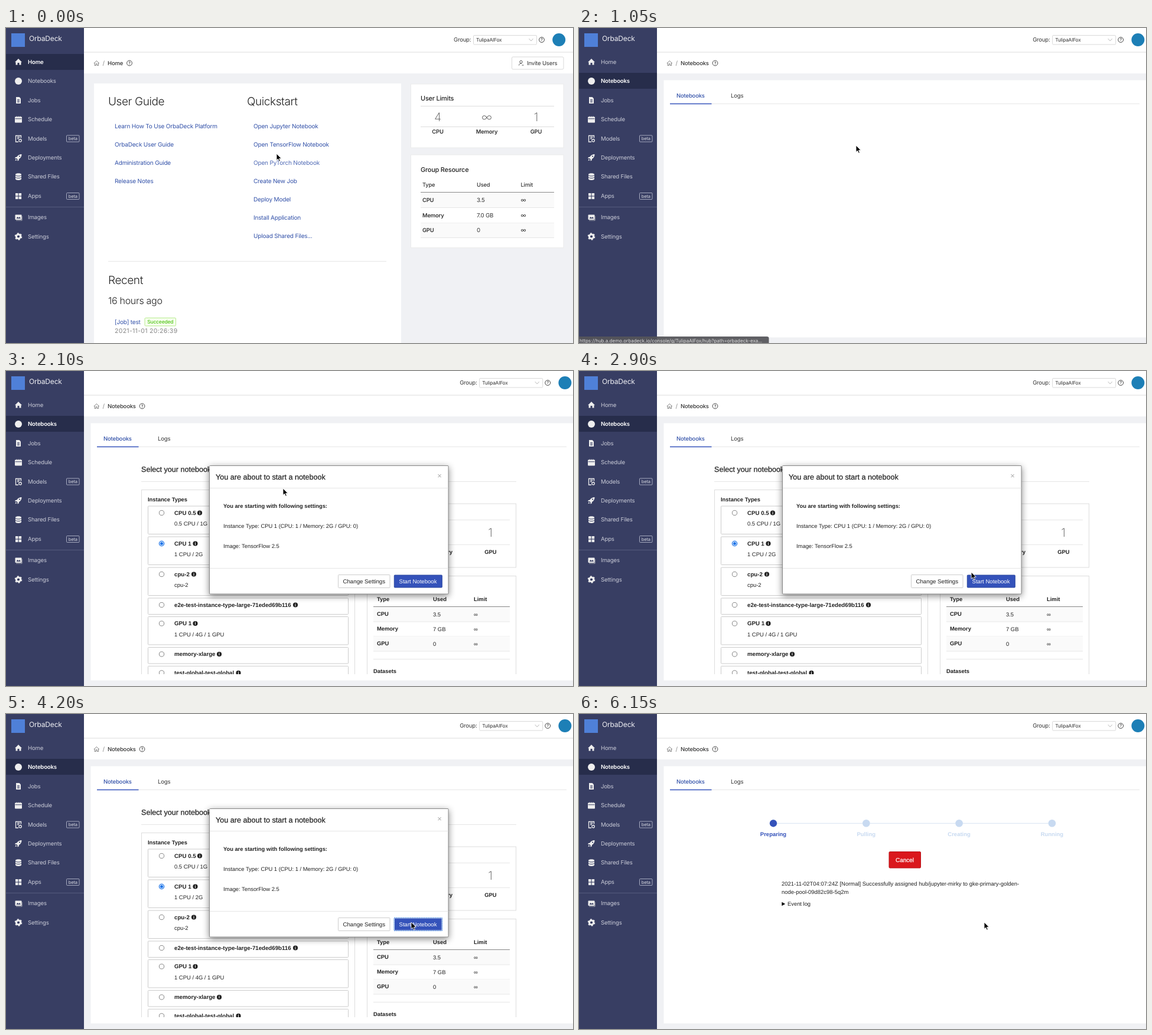
An HTML page for the animation above (6350 ms loop, 960 by 534 pixels).

```html
<!DOCTYPE html>
<html lang="en">
<head>
<meta charset="utf-8">
<title>Notebook launch</title>
<style>
html, body { margin: 0; width: 100%; height: 100%; overflow: hidden; background: #f0f1f4; }
svg { display: block; width: 960px; height: 534px; }
text { font-family: Inter, sans-serif; letter-spacing: -.18px; white-space: pre; text-rendering: geometricPrecision; }
.h { font-family: "Liberation Sans", Arial, sans-serif; letter-spacing: 0; }
</style>
</head>
<body>
<svg id="stage" viewBox="0 0 960 534"></svg>
<script>
const LOOP = 6350, INK = '#333', LINK = '#3150a8', BLUE = '#3452ba', PALE = '#c8daf1', NAVY = '#383e63', SIDE = 132;

// Drawing helpers; text is placed by the middle of its capitals.
const text = (x, y, s, size = 10, fill = INK, more = '') =>
  `<text x="${x}" y="${y + size * .36}" font-size="${size}" fill="${fill}" ${more}>${s}</text>`;
const helv = (x, y, s, size = 9.45, fill = '#222', more = '') => text(x, y - .4, s, size, fill, 'class="h" ' + more);
const rect = (x, y, w, h, fill, stroke = 'none', more = '') =>
  `<rect x="${x}" y="${y}" width="${w}" height="${h}" fill="${fill}" stroke="${stroke}" ${more}/>`;
const line = (x1, x2, y, stroke = '#e6e6e6', width = 1) =>
  `<path d="M${x1} ${y}H${x2}" stroke="${stroke}" stroke-width="${width}"/>`;
const circle = (x, y, r, fill, more = '') => `<circle cx="${x}" cy="${y}" r="${r}" fill="${fill}" ${more}/>`;
const path = (d, fill, more = '') => `<path d="${d}" fill="${fill}" ${more}/>`;
const at = (x, y, s) => `<g transform="translate(${x} ${y})">${s}</g>`;
const layer = (id, s) => `<g id="${id}">${s}</g>`;
const MID = 'text-anchor="middle"', BOLD = 'font-weight="700"', SEMI = 'font-weight="600"',
      MEDIUM = 'font-weight="500"', LIGHT = 'font-weight="300" style="letter-spacing:-.4px"',
      HEAVIER = 'stroke="#222" stroke-width=".25"';

const outline = 'stroke="#eee" stroke-width="1.3"';
const icons = {
  home: path('M-6 .5 0-5.5 6 .5H4.5V5H1.5V1.5H-1.5V5H-4.5V.5Z', '#eee'),
  doc: path('M-4-5.5H1.5L4-3V5.5H-4Z', '#eee') + path('M-2-1H2M-2 1H2M-2 3H2', 'none', `stroke="${NAVY}"`),
  calendar: path('M-5.5-4H5.5V5H-5.5ZM-3-5.5V-3M0-5.5V-3M3-5.5V-3', '#eee', 'stroke="#eee"') +
    path('M-5.5-1.2H5.5', 'none', `stroke="${NAVY}"`),
  model: path('M4.5-1V-5H-4.5V5.5H0M-2-2.5H2.5M-2 0H1', 'none', outline) + circle(3, 3.2, 2.2, 'none', outline),
  rocket: path('M5.5-5.5C1-5.5-1.5-3-2.5-1L-5-.5-6 1.5-3 1.5-1.5 3-1.5 6 .5 5 1 2.5C3 1.5 5.5-1 5.5-5.5ZM-5.5 5.5-4.5 2.5-2.5 4.5Z', '#eee') +
    circle(2, -2, 1.1, NAVY),
  disks: path('M-5-4C-5-6.5 5-6.5 5-4V4C5 6.5-5 6.5-5 4Z', '#eee') +
    path('M-5-2.5C-4-.5 4-.5 5-2.5M-5 1C-4 3 4 3 5 1', 'none', `stroke="${NAVY}"`),
  tiles: [-5, .6].map(x => [-5, .6].map(y => rect(x, y, 4.5, 4.5, '#eee')).join('')).join(''),
  picture: rect(-5.5, -4.5, 11, 8.5, '#eee', 'none', 'rx="1"') +
    path('M-3.5 2-1.5-1 .5 1 2-1 4 2Z', NAVY) + path('M-4 5.2H6V-2', 'none', 'stroke="#ccc" stroke-width=".8"'),
  gear: circle(0, 0, 3.6, 'none', 'stroke="#eee" stroke-width="3"') +
    circle(0, 0, 5.4, 'none', 'stroke="#eee" stroke-width="1.8" stroke-dasharray="2.8 2.85"'),
  dot: circle(0, 0, 6, '#eee')
};
const menu = [
  ['Home', 57.5, 'home'], ['Notebooks', 90, 'dot'], ['Jobs', 122.5, 'doc'], ['Schedule', 155, 'calendar'],
  ['Models', 187.5, 'model', 1], ['Deployments', 219.5, 'rocket'], ['Shared Files', 252, 'disks'],
  ['Apps', 285, 'tiles', 1], ['Images', 321, 'picture'], ['Settings', 353.5, 'gear']
];
const sidebar = active => rect(0, 0, SIDE, 534, NAVY) + rect(9, 9, 23, 23, '#4f80d8') +
  text(39, 18, 'OrbaDeck', 12, '#f0f0f4') +
  menu.map(([name, y, icon, beta]) => {
    const on = name === active;
    return (on ? rect(0, Math.floor(y - 13.5), SIDE, 27, '#272d4b') : '') + at(21, y, icons[icon]) +
      text(37, y, name, 9.6, on ? '#fff' : '#c9cbd7', on ? SEMI : '') +
      (beta ? rect(102.5, y - 5.5, 21.5, 11, 'none', '#a3a7bd', 'rx="1"') + text(113.3, y - .2, 'beta', 7.6, '#d5d7e0', MID) : '');
  }).join('') + line(0, SIDE, 303.5, '#555b7e');

const help = (x, y, c = '#444') => circle(x, y, 4.4, 'none', `stroke="${c}"`) + text(x, y, '?', 6.8, c, MID + ' ' + SEMI);
const header = (title, helpX, shift) => rect(SIDE, 0, 828, 77, '#fff') + line(SIDE, 960, 41, '#ddd') +
  at(shift, 0, text(758, 20, 'Group:', 9.5) + rect(791.5, 12.5, 107, 15.5, '#fff', '#d9d9d9', 'rx="1.5"') +
    text(796, 20, 'TulipaAIFox', 8.3) + path('M885.5 18 889 22 892.5 18', 'none', 'stroke="#bbb"') +
    help(907, 20) + circle(936.2, 20, 11, '#1d7fb6')) +
  at(153.3, 59.5, path('M-4.5 .5 0-4 4.5 .5M-3.2-.5V4H-1V1.2H1V4H3.2V-.5', 'none', 'stroke="#777" stroke-width=".9"')) +
  text(163.5, 59.5, '/', 10, '#888') + text(172, 59.5, title, 9.5, INK, MEDIUM) + help(helpX, 59.5);

const stripes = (x, w, rows, draw) => rows.map((r, i) =>
  (i % 2 ? '' : rect(x, r[0] - 12.5, w, 25, '#fafafa')) + line(x, x + w, r[0] + 12.5) + draw(...r)).join('');
const links = (x, names) => names.map((s, i) =>
  text(x, 166 + 31.1 * i, s, 10, LINK, x > 400 ? `id="link${i}"` : '')).join('');

const home = sidebar('Home') + header('Home', 209, 0) +
  rect(856.5, 49, 87.5, 21, '#fff', '#d9d9d9', 'rx="2"') +
  at(872, 59.5, circle(0, -2, 2.2, 'none', 'stroke="#555"') + path('M-3.5 4C-3 0 0 .5 1 1M1.5 3.5H4.5', 'none', 'stroke="#555"')) +
  text(882, 59.5, 'Invite Users', 9.6) +
  rect(149, 94, 520, 440, '#fff') +
  text(173, 124.5, 'User Guide', 19, '#222', LIGHT) + text(408, 124.5, 'Quickstart', 19, '#222', LIGHT) +
  links(184, ['Learn How To Use OrbaDeck Platform', 'OrbaDeck User Guide', 'Administration Guide', 'Release Notes']) +
  links(419, ['Open Jupyter Notebook', 'Open TensorFlow Notebook', 'Open PyTorch Notebook', 'Create New Job',
    'Deploy Model', 'Install Application', 'Upload Shared Files...']) +
  line(173, 644, 395.5) + text(173, 427.5, 'Recent', 19, '#222', LIGHT) +
  text(173, 462, '16 hours ago', 16, '#222', 'font-weight="300" style="letter-spacing:-.3px"') +
  text(184, 498.5, '[Job] test', 10, LINK) + rect(235, 491.5, 52.5, 13.5, '#f6ffed', '#b7eb8f', 'rx="1.5"') +
  text(261.3, 498, 'Succeeded', 8.5, '#52c41a', MID + ' ' + MEDIUM) +
  text(184, 513.5, '2021-11-01 20:26:39', 10.5, '#858585', 'style="letter-spacing:.3px"') +
  rect(685.5, 95, 258.5, 108, '#fff', '#ebebeb') + text(702, 119.5, 'User Limits', 10.9, '#222', MEDIUM) +
  line(702, 928, 132.5, '#ddd') + line(702, 928, 167.5, '#ddd') +
  [[731, '4', 'CPU'], [814, '∞', 'Memory'], [897.5, '1', 'GPU']].map(([x, n, s]) =>
    text(x, 150.5, n, 20, '#555', MID + ' font-weight="200"') + text(x, 176, s, 9.4, INK, MID + ' ' + SEMI)).join('') +
  rect(685.5, 215, 258.5, 157.5, '#fff', '#ebebeb') + text(702, 240, 'Group Resource', 10.9, '#222', MEDIUM) +
  text(705, 266, 'Type', 9.3, INK, MEDIUM) + text(797, 266, 'Used', 9.3, INK, MEDIUM) + text(871.5, 266, 'Limit', 9.3, INK, MEDIUM) +
  line(702, 928, 278.5, '#888', 1.2) +
  stripes(702, 226, [[292, 'CPU', '3.5'], [318, 'Memory', '7.0 GB'], [343, 'GPU', '0']], (y, s, n) =>
    text(705, y, s, 9.4, INK, SEMI) + text(797, y, n, 9.7) + text(871.5, y, '∞', 9.7));

const notebooks = sidebar('Notebooks') + header('Notebooks', 230.5, 10.2) + rect(143.5, 88.5, 817, 436, '#fff') +
  text(165, 115, 'Notebooks', 9.5, LINK, MEDIUM) + text(257, 115, 'Logs', 9.6) +
  line(154, 949, 128.5) + line(154, 224.5, 128.5, BLUE, 1.5);

// [row middle, title, details, x of the info mark]
const types = [
  [240.5, 'CPU 0.5', '0.5 CPU / 1G', 328], [292.5, 'CPU 1', '1 CPU / 2G', 320.5], [344.5, 'cpu-2', 'cpu-2', 318],
  [396.5, 'e2e-test-instance-type-large-71eded69b116', '', 490], [428, 'GPU 1', '1 CPU / 4G / 1 GPU', 320.5],
  [480, 'memory-xlarge', '', 361], [511.8, 'test-global-test-global', '', 393.5]
];
const form = '<clipPath id="fold"><path d="M144 130H950V514H144Z"/></clipPath><g clip-path="url(#fold)">' +
  helv(229, 167, 'Select your notebook options', 12.6, '#222', HEAVIER) + line(229, 864, 187.5) +
  rect(229.5, 201.5, 361, 340, '#fff', '#ddd') + helv(240, 218.5, 'Instance Types', 9.4, '#222', BOLD) +
  types.map(([y, name, details, x], i) =>
    rect(240.5, y - 11.5, 339, details ? 47.5 : 27.5, '#fff', '#ccc', 'rx="1"') +
    circle(263.5, y, 4.1, '#fff', i === 1 ? 'stroke="#1a73e8" stroke-width="1.3"' : 'stroke="#777" stroke-width=".9"') +
    (i === 1 ? circle(263.5, y, 2.5, '#1a73e8') : '') +
    helv(285, y, name, 9.7, '#222', BOLD) + helv(285, y + 18.7, details) +
    circle(x, y, 4.1, '#222') + helv(x, y, 'i', 7, '#fff', MID + ' ' + BOLD)).join('') +
  rect(611.5, 225, 252, 108, '#fff', '#ddd') + line(622, 853, 252.5) + line(622, 853, 294.5) +
  text(820, 273.5, '1', 20, '#555', MID + ' font-weight="200"') +
  helv(756, 307, 'Memory', 9.4, '#222', 'text-anchor="end" ' + BOLD) + helv(820.5, 307, 'GPU', 9.4, '#222', MID + ' ' + BOLD) +
  rect(611.5, 347.5, 252, 200, '#fff', '#ddd') +
  [[628, 'Type'], [723, 'Used'], [792, 'Limit']].map(([x, s]) => helv(x, 387, s, 9.4, '#222', BOLD)).join('') +
  line(622, 853, 399.5, '#888', 1.2) +
  stripes(622, 231, [[412.5, 'CPU', '3.5'], [437.5, 'Memory', '7 GB'], [462.5, 'GPU', '0']], (y, s, n) =>
    helv(628, y, s, 9.4, '#222', BOLD) + helv(723, y, n) + helv(792, y, '∞')) +
  line(622, 853, 488.5) + helv(622, 509, 'Datasets', 9.4, '#222', BOLD) + '</g>' +
  rect(344.5, 160.5, 404.5, 217.5, '#fff', '#888', 'rx="1" style="filter:drop-shadow(0 3px 6px #0007)"') +
  helv(355, 180, 'You are about to start a notebook', 12.6, '#222', HEAVIER) + helv(734, 178, '×', 13, '#aaa', MID) +
  line(345, 748.5, 198.5) + helv(368, 229.5, 'You are starting with following settings:', 9.3, '#222', BOLD) +
  helv(368, 263.4, 'Instance Type: CPU 1 (CPU: 1 / Memory: 2G / GPU: 0)', 9.4) + helv(368, 297.3, 'Image: TensorFlow 2.5', 9.4) +
  line(345, 748.5, 334.5) + rect(562.5, 345.5, 87.5, 22, '#fff', '#ccc', 'rx="1"') +
  helv(606.3, 356.7, 'Change Settings', 9.7, '#222', MID) +
  rect(657.3, 346, 81, 21, BLUE, '#2c489f', 'rx="1"') +
  layer('focus', rect(657.5, 346, 80.5, 21, 'none', '#fff') + rect(657, 345.5, 81.5, 22, 'none', '#4a8fe8', 'stroke-dasharray="2 1"')) +
  helv(697.5, 356.7, 'Start Notebook', 9.6, '#fff', MID);

const steps = layer('track', line(329, 801, 185.3, '#bcd0ea')) +
  ['Preparing', 'Pulling', 'Creating', 'Running'].map((s, i) =>
    circle(329 + 157.3 * i, 185.3, 6.3, PALE) +
    helv(329 + 157.3 * i, 204.4, s, 9.5, PALE, (i ? '' : 'id="idle" ') + MID + ' ' + BOLD)).join('') +
  circle(329, 185.3, 6.1, BLUE, 'id="dot"') +
  rect(525, 233.5, 53.5, 27.5, '#da171c', '#b91218', 'rx="1.5"') +
  helv(551.5, 247.7, 'Cancel', 10, '#fff', MID + ' stroke="#fff" stroke-width=".25"') +
  layer('message', helv(329, 204.4, 'Preparing', 9.5, BLUE, MID + ' ' + BOLD) +
    helv(343, 288.4, '2021-11-02T04:07:24Z [Normal] Successfully assigned hub/jupyter-mirky to gke-primary-golden-') +
    helv(343, 301.8, 'node-pool-09d82c98-5q2m')) +
  layer('log', path('M343.3 291.8 349.3 295 343.3 298.2Z', '#111') + helv(353, 295.3, 'Event log', 9.4));

const status = path('M0 523H318Q321.5 523 321.5 526V534H0Z', '#55565a', 'fill-opacity=".93"') +
  text(1, 530.3, 'https://hub.a.demo.orbadeck.io/console/g/TulipaAIFox/hub?path=orbadeck-exa...', 8, '#e2e2e2', 'style="letter-spacing:0"');
const pointer = layer('arrow', path('M0 0V11.4L2.6 9 4.5 13.2 6.4 12.4 4.6 8.3H8.2Z', '#000', 'stroke="#fff" stroke-width=".9"')) +
  layer('hand', path('M-1.2 8V1.2C-1.2-.4 1.1-.4 1.1 1.2V5C1.6 4.2 3 4.4 3.1 5.3 3.7 4.7 5 5 5.1 5.9 5.7 5.4 6.8 5.8 6.8 6.8V9.5C6.8 11 5.9 11.7 5.8 13.2H.3C0 11.6-3.2 9.2-3.4 7.6-3.4 6.4-2 6.7-1.2 8Z',
    '#fff', 'stroke="#111" stroke-width=".9"') + path('M1.6 8.3V11M3.2 8.3V11M4.8 8.3V11', 'none', 'stroke="#111" stroke-width=".6"')) +
  layer('barred', circle(6, 16, 5.3, '#fff', 'fill-opacity=".7" stroke="#8a93a8" stroke-width="1.5"') +
    path('M2.5 12.5 9.5 19.5', 'none', 'stroke="#8a93a8" stroke-width="1.5"'));

document.getElementById('stage').innerHTML = rect(0, 0, 960, 534, '#f0f1f4') +
  layer('home', home) + layer('notebooks', notebooks) + layer('form', form) + layer('steps', steps) +
  layer('status', status) + layer('pointer', pointer);

const $ = id => document.getElementById(id);
const show = (id, on) => $(id).setAttribute('visibility', on ? 'inherit' : 'hidden');
const fade = (id, value) => $(id).setAttribute('opacity', value);
const ramp = (t, a, b) => Math.min(1, Math.max(0, (t - a) / (b - a)));
const smooth = (t, a, b) => { const u = ramp(t, a, b); return u * u * (3 - 2 * u); };

const route = [[0, 458, 213], [450, 469, 199], [2250, 469, 199], [2950, 667, 343], [3450, 686, 353]];
function position(t) {
  let i = 0;
  while (i < route.length - 2 && t >= route[i + 1][0]) i++;
  const [t0, x0, y0] = route[i], [t1, x1, y1] = route[i + 1], u = smooth(t, t0, t1);
  return [x0 + (x1 - x0) * u, y0 + (y1 - y0) * u];
}

function draw(t) {
  const onHome = t < 900, launched = t >= 5000, ready = t >= 5300;
  show('home', onHome);
  show('notebooks', !onHome);
  show('form', t >= 1450 && !launched);
  show('steps', launched);
  show('focus', t >= 3600 && !launched);
  fade('link1', 1 - .25 * ramp(t, 350, 600));
  fade('link2', .85 + .15 * ramp(t, 50, 300));
  fade('status', ramp(t, 480, 620) * (1 - ramp(t, 1080, 1300)));

  show('message', ready);
  show('idle', launched && !ready);
  fade('dot', ramp(t, 5250, 5700));
  fade('track', ready ? .6 : 1);
  $('log').setAttribute('transform', `translate(0 ${ready ? 27 : 0})`);

  const [x, y] = position(t), overLink = onHome && y < 204, overButton = y > 345 && t > 2900 && t < 3600;
  $('pointer').setAttribute('transform', `translate(${x} ${y})`);
  show('hand', overLink || overButton);
  show('arrow', !overLink && !overButton);
  show('barred', t >= 3600 && t < 4150);
}

function tick() {
  draw(Math.floor(performance.now() % LOOP / 50) * 50);
  requestAnimationFrame(tick);
}
tick();
</script>
</body>
</html>
```
